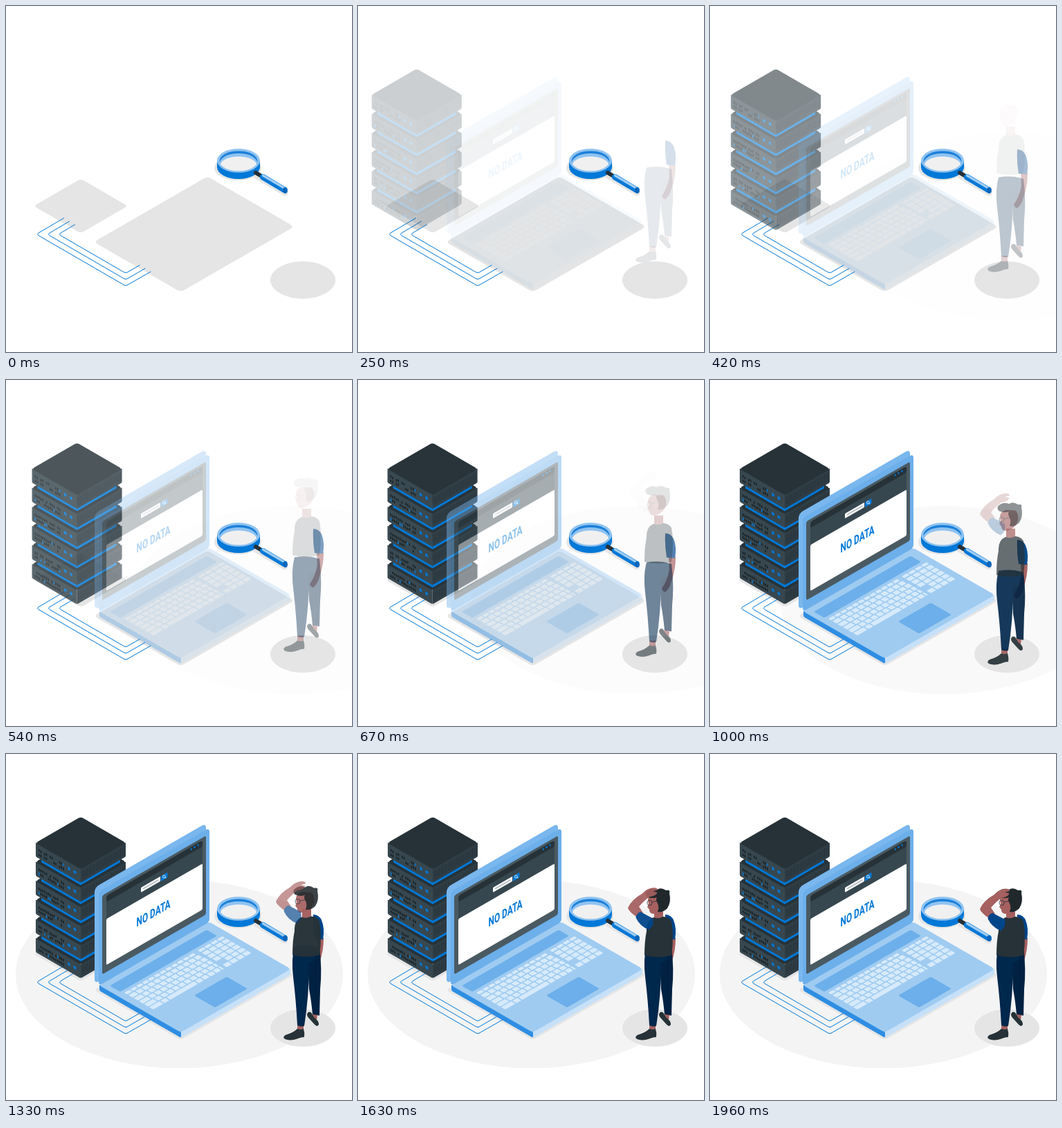
Recreate the animation shown at these times as an HTML page. Size 500 by 500 pixels, loop 2.21 s.

```html
<!DOCTYPE html>
<html lang="en">
<head>
<meta charset="utf-8">
<title>No data</title>
<style>
  html, body { margin: 0; width: 100%; height: 100%; overflow: hidden; background: #fff; }
  svg { display: block; width: 100vw; height: 100vh; }
  text { font: 700 18px Roboto, "Open Sans", sans-serif; }
</style>
</head>
<body>
<svg id="stage" viewBox="0 0 500 500"></svg>
<script>
const BLUE = '#0078d7', DARK = '#263238', SLATE = '#37474f', NAVY = '#00274c',
      SLEEVE = '#00458a', SKIN = '#a5605f', SHADE = '#e5e5e5',
      PALE = '#9fcbf1', MID = '#6cafea', DEEP = '#2f8ee2';

// Flat shapes
const path = (d, fill, extra = '') => `<path d="${d}" fill="${fill}" ${extra}/>`;
const line = (d, color, width) =>
  path(d, 'none', `stroke="${color}" stroke-width="${width}" stroke-linecap="round"`);
const oval = (x, y, rx, ry, fill) =>
  `<ellipse cx="${x}" cy="${y}" rx="${rx}" ry="${ry}" fill="${fill}"/>`;
const rect = (x, y, w, h, fill, r = 0) =>
  `<rect x="${x}" y="${y}" width="${w}" height="${h}" rx="${r}" fill="${fill}"/>`;
const group = (id, body) => `<g id="${id}">${body}</g>`;
const shift = (x, y, body) => `<g transform="translate(${x} ${y})">${body}</g>`;

// Isometric planes: a floor seen from its left corner, walls rising or falling to the right
const SLOPE = .577;
const onFloor = (x, y, body) => `<g transform="matrix(1 ${-SLOPE} 1 ${SLOPE} ${x} ${y})">${body}</g>`;
const onWall = (x, y, slope, body) => `<g transform="matrix(1 ${slope} 0 1 ${x} ${y})">${body}</g>`;
const floor = (x, y, w, h, fill, r) => onFloor(x, y, rect(0, 0, w, h, fill, r));
const rising = (x, y, w, h, fill, r) => onWall(x, y, -SLOPE, rect(0, 0, w, h, fill, r));
const falling = (x, y, w, h, fill, r) => onWall(x, y, SLOPE, rect(0, 0, w, h, fill, r));

let seed = 7;
const random = () => (seed = seed * 16807 % 2147483647) / 2147483647;

function wire(i) {
  const tip = 44 + 16 * i, low = 330 + (173 - tip) * SLOPE;
  return line(`M${83.5 + 8 * i} ${306.5 + 4.7 * i}L${tip + 3} 328q-3 2 0 3.7` +
    `L171 ${low - 1}q2 1 4 0L${209 - 8 * i} ${384 - 4.7 * i}`, BLUE, 1);
}

function ground() {
  return floor(40, 289, 68, 68, SHADE, 4) + floor(127, 341, 164, 125.5, SHADE, 5) +
    oval(429, 396, 47, 27, SHADE) + [0, 1, 2].map(wire).join('');
}

function magnifier() {
  const handle = (from, to, color, width) => line(`M${from}L${to}`, color, width);
  return oval(335, 234, 34, 18, SHADE) + handle('362 246', '403 270', SHADE, 8) +
    path('M305 223V233A31 17 0 0 0 367 233V223Z', BLUE) +
    oval(336, 223.5, 31, 17.3, '#8fc3f0') +
    '<clipPath id="lens"><ellipse cx="336" cy="224" rx="27.5" ry="14.5"/></clipPath>' +
    `<g clip-path="url(#lens)">${rect(300, 200, 70, 50, '#1c80da') +
      oval(336, 227.5, 27.5, 14.5, '#8fc3f0') + oval(336, 231.5, 27, 14, '#f0f0f0')}</g>` +
    handle('361 241', '367 244.5', DARK, 6) +
    handle('371 247', '402 265.5', BLUE, 8.5) + handle('371.5 245', '403 263.5', PALE, 3.5) +
    oval(403.5, 266.5, 3.4, 4.4, '#0565bb');
}

function serverUnit(resting) {
  let vents = '', panel = '';
  for (let x = 2; x < 64; x += 2.5) vents += rect(x, 4, .7, 12, '#243037');
  for (let row = 0; row < 2; row++)
    for (let x = 4; x < 40; x += 2.7)
      if (random() > .2)
        panel += rect(x, 5.5 + row * 6 + random(), 1.6, 3.6, random() > .9 ? BLUE : '#172024', .4);
  panel += oval(48, 9, 2, 2.3, BLUE) + oval(56.5, 9, 2, 2.3, BLUE);
  const spacer = falling(51, 145, 57, 11.5, BLUE) + rising(108, 178, 57, 11.5, BLUE);
  return (resting ? '' : spacer) +
    falling(43, 127.5, 65, 21, SLATE, 1.5) + rising(108, 165, 65, 21, '#2f3d45', 1.5) +
    onWall(108, 166, -SLOPE, vents) + onWall(43, 129, SLOPE, panel) +
    floor(42.5, 128.5, 65.5, 65.5, DARK, 4);
}

function server() {
  let body = '';
  for (let i = 5; i >= 0; i--) body += shift(0, i * 27.6, serverUnit(i === 5));
  return body;
}

function keyboard() {
  const WIDE = 102, GAP = 1.6;
  let keys = '';
  for (let row = 0; row < 6; row++) {
    const y = row && row * 7.5 - 1.5, h = row ? 6 : 4;
    const key = (x, w) => keys += rect(x, y, w, h, '#d6eafb', .7);
    for (let x = 0; x < WIDE - 2;) {
      const space = row === 5 && x > 24 && x < 32;
      const w = Math.min(space ? 40 : x ? 6.8 : 7 + row * 1.5, WIDE - x);
      key(x, w);
      x += w + GAP;
    }
    for (let col = 0; col < 4; col++)
      if (row !== 4 || col) key(WIDE + 4 + col * 9.3, 7.7);
  }
  return onFloor(171, 345, keys);
}

function base() {
  return falling(135, 333, 118, 9, DEEP, 2) + rising(253, 401, 158, 9, '#c6e0f8', 2) +
    floor(134, 334, 159, 118.5, PALE, 4) + floor(150, 335, 140, 15, MID, 2) +
    keyboard() + floor(272, 349, 47, 30, MID, 2);
}

function lid() {
  let dots = '';
  for (let i = 0; i < 3; i++) dots += oval(267.5 + i * 5, 137.5 - i * 2.9, 1.2, 1.5, BLUE);
  return rising(128, 193, 161, 139, '#79b7ee', 6) + rising(134, 199, 160, 136, MID, 5) +
    rising(139, 204.5, 150, 114, '#4a5a62', 3) +
    rising(145, 205, 139, 100, SLATE, 3) + rising(145, 205, 139, 9, DARK, 3) +
    rising(145, 238.5, 139, 66.5, '#fff', 2) + dots +
    rising(195, 193, 28, 7, '#fff', 1) + line('M198.5 194.5L219.5 182.3', '#b9bfc3', 2) +
    rising(224, 176.5, 9.5, 7.5, BLUE, 1) +
    '<ellipse cx="228.3" cy="177" rx="1.8" ry="2.1" fill="none" stroke="#fff" stroke-width=".8"/>' +
    line('M229.5 178.5L231 179', '#fff', .8) +
    `<text transform="matrix(.66 ${-.66 * SLOPE} 0 1 188.5 250)" fill="${BLUE}">NO DATA</text>`;
}

// Body parts, back to front, each with its start in ms
const parts = [
  { id: 'sideArm', delay: -60, art:
    path('M449 265L459 266Q459 285 453 301Q451 311 444 317Q440 316 439 312Q447 300 450 285Z', SKIN) +
    path('M444 232Q452 232 456 240Q461 252 458 268L446 267Q443 250 444 232Z', SLEEVE) },
  { id: 'feet', delay: 0, art:
    path('M443 374L450 377L449 384L443 382Z', SKIN) +
    path('M437 373Q433 376 437 381L446 391Q450 395 452 391Q452 386 448 383Q444 380 442 375Q440 372 437 373Z', DARK) +
    path('M421 390H430V399H421Z', SKIN) +
    path('M421 397Q426 399 430 397Q432 403 431 409Q426 409 421 411.5Q411 415 403 412Q399 409 404 406Q415 403 421 397Z', DARK) },
  { id: 'legs', delay: 20, art:
    path('M430 278L453 280Q457 310 454 340L453 378L443 376Q441 355 438 340L436 300Z', '#002141') +
    path('M417 278Q434 275 449 279L447 298L438 302Q438 350 431 393Q426 395 421 392Q419 355 415 322Q412 296 417 278Z', NAVY) },
  { id: 'torso', delay: 240, art:
    path('M428 224H441V238Q434 242 428 237Z', SKIN) +
    path('M427 236Q434 239 441 235Q450 236 453 242Q457 262 453 291Q434 296 414 291Q414 270 417 256Q416 241 427 236Z', DARK) },
  { id: 'head', delay: 330, art:
    path('M419 210Q420 203 428 201L442 202Q449 212 442 223Q436 230 428 231Q421 231 421 225L418 221L420 217Z', SKIN) +
    '<circle cx="421.5" cy="215" r="3.6" fill="none" stroke="#263238" stroke-width=".8"/>' +
    line('M425 214L434 212', DARK, .8) },
  { id: 'hair', delay: 400, art:
    path('M417 206Q413 200 419 197Q425 193 432 196Q438 192 445 197Q452 196 450 201Q453 214 447 223Q440 230 433 228Q436 220 432 214Q430 210 432 207Q425 210 417 206Z', '#20282c') },
  { id: 'raisedArm', delay: 610, art:
    path('M390 224Q395 212 411 203Q417 196 425 195Q433 194 433 198L426 200Q434 201 432 203Q429 207 421 208Q414 213 406 222L412 231L404 238Q391 229 390 224Z', SKIN) +
    path('M401.5 238Q402 232 408 229.5L426 239Q429 249 420 255.5Q407 250 401.5 238Z', SLEEVE) }
];

const stage = document.getElementById('stage');
stage.innerHTML = group('disc', oval(250.5, 318, 236.5, 136, '#f4f4f4')) +
  ground() + magnifier() + group('server', server()) + group('laptop', base() + lid()) +
  parts.map((part) => group(part.id, part.art)).join('');

// Easing
const clamp = (x) => Math.max(0, Math.min(1, x));
const easeIn = (x) => clamp(x) ** 2;
const easeOut = (x) => 1 - (1 - clamp(x)) ** 2;
const smooth = (x) => clamp(x) ** 2 * (3 - 2 * clamp(x));

function overshoot(x) {
  const curve = (a, b, s) => 3 * (1 - s) ** 2 * s * a + 3 * (1 - s) * s * s * b + s ** 3;
  let low = 0, high = 1;
  for (let i = 0; i < 24; i++) {
    const s = (low + high) / 2;
    if (curve(.36, .5, s) < clamp(x)) low = s; else high = s;
  }
  return curve(-.01, 1.38, low);
}

function pose(id, x, y, opacity) {
  const node = document.getElementById(id);
  node.setAttribute('transform', `translate(${x.toFixed(2)} ${y.toFixed(2)})`);
  node.setAttribute('opacity', clamp(opacity).toFixed(3));
}

const LOOP = 2210, STEP = 1000 / 24, LAST = 47;

function draw(now) {
  const tick = Math.min(LAST, Math.floor((now % LOOP + 5) / STEP));
  const t = tick * STEP;
  const slide = overshoot(t / 1000), sweep = easeIn(t / 1330);
  pose('server', 30 * (slide - 1), 0, slide);
  pose('disc', 200 * (1 - sweep), 0, sweep);
  pose('laptop', 0, 0, easeIn(t / 1000));
  for (const { id, delay } of parts) {
    const k = (t - delay) / 1200;
    pose(id, 0, 68 * (easeOut(k) - 1), tick && smooth(k));
  }
}

const start = performance.now();
function play() {
  draw(performance.now() - start);
  requestAnimationFrame(play);
}
play();
</script>
</body>
</html>
```
